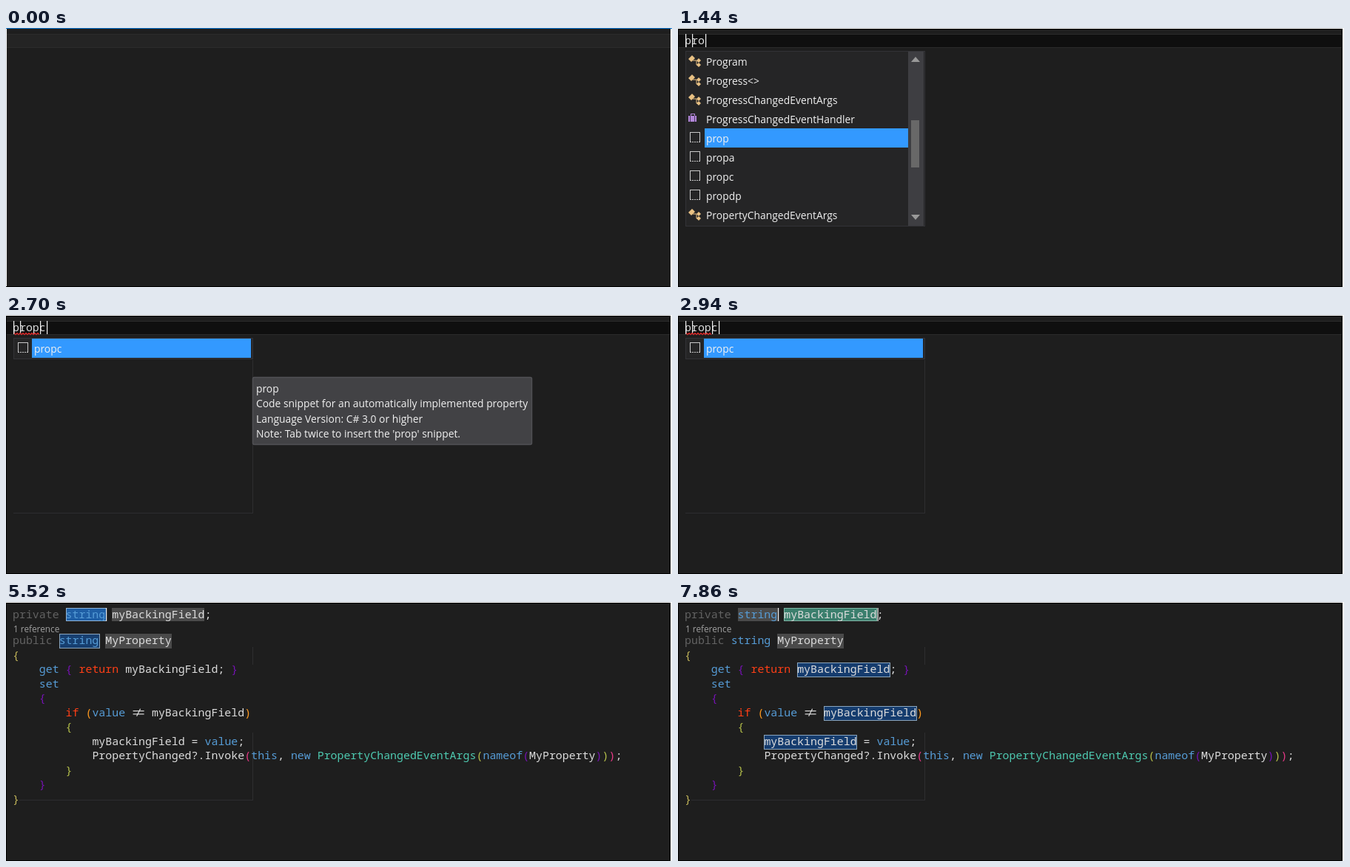
Recreate the animation shown at these times as an HTML page with a canvas. Size 900 px wide and 351 px high, loop 8 s.

```html
<!DOCTYPE html>
<html lang="en">
<head>
<meta charset="utf-8">
<title>Snippet completion</title>
<style>
html, body { margin: 0; width: 100%; height: 100%; overflow: hidden; background: #1e1e1e; }
canvas { display: block; }
</style>
</head>
<body>
<canvas id="stage" width="900" height="351"></canvas>
<script>
const ctx = document.getElementById('stage').getContext('2d');
const LOOP = 8000;
const CELL = 8.95, LEFT = 9, LINE = 19.5;
const MONO = '14.92px "Noto Sans Mono", monospace';
const UI = '13.85px "Open Sans", sans-serif';
const LENS = '11.8px "Open Sans", sans-serif';

const C = {
  bg: '#1e1e1e', text: '#dcdcdc', dim: '#626262', key: '#569cd6', flow: '#ff3f16',
  type: '#4ec9b0', gold: '#c3b65a', purple: '#7612b4', orange: '#ff9a1f',
  lime: '#b5c04a', pink: '#e63a86', select: '#3399ff', field: '#4a4a4a', line: '#2d2d30'
};

const colX = col => LEFT + col * CELL;
const baseY = row => row ? 57.2 + (row - 1) * LINE : 22.2;
const between = (t, a, b) => t >= a && t < b;

function rect(x, y, w, h, color) {
  ctx.fillStyle = color;
  ctx.fillRect(x, y, w, h);
}

function frame(x, y, w, h, color) {
  ctx.strokeStyle = color;
  ctx.lineWidth = 1;
  ctx.strokeRect(x + .5, y + .5, w - 1, h - 1);
}

function label(str, x, y, font, color) {
  ctx.font = font;
  ctx.fillStyle = color;
  ctx.fillText(str, x, y);
}

function path(points, color, width = 1, close = false) {
  ctx.beginPath();
  points.forEach(([x, y]) => ctx.lineTo(x, y));
  if (close) {
    ctx.closePath();
    ctx.fillStyle = color;
    ctx.fill();
  } else {
    ctx.strokeStyle = color;
    ctx.lineWidth = width;
    ctx.stroke();
  }
}

function withAlpha(a, draw) {
  ctx.save();
  ctx.globalAlpha = a;
  draw();
  ctx.restore();
}

const caret = x => rect(x, 8, 1.2, 18, '#f0f0f0');

function squiggle(x0, x1, y) {
  const points = [];
  for (let x = x0, i = 0; x <= x1; x += 2, i++) points.push([x, y + (i % 2 ? 1.2 : -1.2)]);
  path(points, '#e02828', 1.1);
}

/* ---------- editor window ---------- */

function drawWindow(t) {
  rect(0, 0, 900, 351, C.bg);
  const focused = t >= 240;
  if (t < 3840) {
    rect(1, 8, 897, 19, focused ? '#2b2b2b' : '#2c2c2c');
    rect(1, 9, 897, 17, focused ? '#0f0f0f' : '#242424');
  }
  rect(0, 0, 1, 351, focused ? '#000' : '#fff');
  rect(898, 0, 2, 351, '#fff');
  rect(0, 350, 898, 1, '#000');
  if (focused) {
    rect(897, 0, 1, 351, '#000');
    rect(0, 1, 898, 1, '#000');
  }
  rect(0, 0, 900, 1, focused ? '#fff' : '#0a74d0');
}

function drawTyping(t) {
  const count = [1050, 1290, 1380, 1620, 2700].filter(at => t >= at).length;
  label('propc'.slice(0, count), LEFT, 22.2, MONO, C.text);
  if (between(t, 240, 780) || t >= 1050) caret(10);
  if (t >= 1050) caret(19);
  if (between(t, 1290, 1380)) caret(28);
  if (between(t, 1380, 1620)) caret(37);
  if (between(t, 1620, 1830) || t >= 2310) caret(46);
  if (t >= 2700) {
    caret(55);
    squiggle(11, t < 3630 ? 45 : 55, 25.5);
  }
}

/* ---------- completion list ---------- */

const icons = {
  type(y) {
    const c = '#e9c183';
    path([[14, y - 3], [19, y - 8], [23, y - 4], [18, y + 1]], c, 1, true);
    path([[20, y - 1], [25, y - 1], [25, y + 5], [27, y + 5]], c);
    path([[25, y - 1], [28, y - 4], [31, y - 1], [28, y + 2]], c, 1, true);
    path([[25, y + 5], [28, y + 2], [31, y + 5], [28, y + 8]], c, 1, true);
  },
  contract(y) {
    const c = '#6db5f5';
    ctx.beginPath();
    ctx.arc(27, y - 1, 3, 0, Math.PI * 2);
    ctx.strokeStyle = c;
    ctx.lineWidth = 2;
    ctx.stroke();
    rect(16, y - 2, 8, 1.6, c);
    rect(14, y - 3, 3, 4, c);
  },
  handler(y) {
    const c = '#b387d9';
    rect(14, y - 4, 11, 8, c);
    frame(17, y - 7, 6, 4, c);
    rect(16, y - 4, 1, 8, '#503a68');
    rect(22, y - 4, 1, 8, '#503a68');
  },
  snippet(y) {
    frame(16, y - 8, 14, 14, '#c8c8c8');
    for (let x = 18; x < 29; x += 3) rect(x, y + 5, 1, 1, '#252526');
  }
};

const SNIPPETS = ['prop', 'propa', 'propc', 'propdp'].map(name => ['snippet', name]);
const LIST_PRO = [
  ['type', 'Program'], ['type', 'Progress<>'], ['type', 'ProgressChangedEventArgs'],
  ['handler', 'ProgressChangedEventHandler'], ...SNIPPETS, ['type', 'PropertyChangedEventArgs']
];
const LIST_PROP = [
  ['contract', 'INotifyPropertyChanged'], ['contract', 'INotifyPropertyChanging'], ...SNIPPETS,
  ['type', 'PropertyChangedEventArgs'], ['handler', 'PropertyChangedEventHandler'],
  ['type', 'PropertyChangingEventArgs']
];

function drawRow([kind, name], i) {
  const y = 45 + i * 26;
  icons[kind](y);
  label(name, 38, y + 6, UI, '#f1f1f1');
}

function drawList(t) {
  const scrolled = t >= 1620;
  rect(10, 31, 324, 238, '#252526');
  frame(10, 31, 324, 238, '#333337');
  rect(311, 32, 21, 236, '#3e3e42');
  path([[315, 46], [321, 39], [327, 46]], '#999', 1, true);
  path([[315, 253], [321, 260], [327, 253]], '#999', 1, true);
  if (scrolled) rect(315, 53, 11, 124, '#686868');
  else rect(315, t < 1440 ? 129 : 125, 11, 64, '#686868');
  rect(scrolled ? 35 : 36, scrolled ? 84 : 136, 275, 26, C.select);
  if (scrolled) rect(310, 136, 1, 26, C.select);
  (scrolled ? LIST_PROP : LIST_PRO).forEach(drawRow);
}

function drawSingleRow() {
  rect(10, 31, 324, 29, '#252526');
  frame(10, 31, 324, 29, '#333337');
  rect(35, 32, 296, 26, C.select);
  drawRow(SNIPPETS[2], 0);
}

function drawTooltip() {
  ctx.beginPath();
  ctx.roundRect(333.5, 84.5, 377, 91, 2);
  ctx.fillStyle = '#424245';
  ctx.fill();
  ctx.strokeStyle = '#515155';
  ctx.lineWidth = 1.5;
  ctx.stroke();
  [
    'prop',
    'Code snippet for an automatically implemented property',
    'Language Version: C# 3.0 or higher',
    "Note: Tab twice to insert the 'prop' snippet."
  ].forEach((str, i) => label(str, 338, 105 + i * 20.3, UI, '#f1f1f1'));
}

function tooltipAlpha(t) {
  if (t < 2310 || t >= 2940) return 0;
  if (t < 2400) return .13 + .29 * Math.floor((t - 2310) / 30);
  return t < 2760 ? 1 : 1 - .3 * (1 + Math.floor((t - 2760) / 60));
}

function drawListEdge(t) {
  const inCode = t >= 3840;
  const from = inCode ? 18 : 10;
  rect(from, 268, 334 - from, 1, C.line);
  rect(333, 61, 1, inCode ? 24 : 208, C.line);
  if (inCode) rect(333, 177, 1, 92, C.line);
}

/* ---------- inserted code ---------- */

// [row, column, text, colour, colour once semantic analysis is done]
const TOKENS = [
  [0, 0, 'private', C.dim], [0, 8, 'string', C.key], [0, 15, 'myBackingField;', C.text],
  [1, 0, 'public', C.dim], [1, 7, 'string', C.key], [1, 14, 'MyProperty', C.text],
  [2, 0, '{', C.gold],
  [3, 4, 'get', C.key], [3, 8, '{', C.purple], [3, 10, 'return', C.flow],
  [3, 17, 'myBackingField;', C.text], [3, 33, '}', C.purple],
  [4, 4, 'set', C.key], [5, 4, '{', C.purple],
  [6, 8, 'if', C.flow], [6, 11, '(', C.orange], [6, 12, 'value', C.text, C.key],
  [6, 21, 'myBackingField', C.text], [6, 35, ')', C.orange],
  [7, 8, '{', C.lime],
  [8, 12, 'myBackingField =', C.text], [8, 29, 'value', C.text, C.key], [8, 34, ';', C.text],
  [9, 12, 'PropertyChanged?.Invoke', C.text], [9, 35, '(', C.pink], [9, 36, 'this', C.key],
  [9, 40, ',', C.text], [9, 42, 'new', C.key],
  [9, 46, 'PropertyChangedEventArgs', C.text, C.type], [9, 70, '(', C.lime],
  [9, 71, 'nameof', C.text, C.key], [9, 77, '(', C.purple], [9, 78, 'MyProperty', C.text],
  [9, 88, ')', C.purple], [9, 89, ')', C.lime], [9, 90, ')', C.pink], [9, 91, ';', C.text],
  [10, 8, '}', C.lime], [11, 4, '}', C.purple], [12, 0, '}', C.gold]
];

function mark(row, col, len, fill, border, dotted) {
  const x = Math.round(colX(col)), y = Math.round(baseY(row) - 14);
  const w = Math.round(len * CELL), h = row ? 20 : 18;
  if (fill) rect(x, y, w, h, fill);
  if (!border) return;
  ctx.setLineDash(dotted ? [1, 2] : []);
  frame(x, y, w + 1, h, border);
  ctx.setLineDash([]);
}

function drawMarks(t) {
  const onField = t >= 6210;
  const resolved = t >= 4140;
  mark(0, 8, 6, onField ? C.field : resolved ? '#1f5fa6' : '#2f5274', resolved && !onField && '#8fb4d8');
  mark(1, 14, 10, C.field);
  if (!onField) {
    if (resolved) mark(1, 7, 6, '#173f70', '#8aa5bd');
    else mark(1, 7, 6, '', '#c07a3a', true);
  }
  const found = t >= 6480;
  mark(0, 15, 14, !onField ? C.field : found ? '#3b7f6d' : '#2f5274', found && '#7fb5a5');
  if (t >= 6330) {
    for (const [row, col] of [[3, 17], [6, 21], [8, 12]]) {
      if (found) mark(row, col, 14, '#153c6e', '#8aa5bd');
      else mark(row, col, 14, '', '#c07a3a', true);
    }
  }
}

function drawNotEqual() {
  const x = colX(18), y = baseY(6) - 5;
  rect(x + 1.5, y - 2.6, 15, 1.2, C.text);
  rect(x + 1.5, y + 1.6, 15, 1.2, C.text);
  path([[x + 6.5, y + 5], [x + 11.5, y - 5]], C.text, 1.2);
}

function lensAlpha(t) {
  if (t < 4890) return 0;
  if (t < 5310) return Math.min(4, 1 + Math.floor((t - 4890) / 90)) * .18;
  return Math.min(1, .8 + .1 * Math.floor((t - 5310) / 105));
}

function drawCode(t) {
  drawMarks(t);
  for (const [row, col, str, early, late] of TOKENS) {
    label(str, colX(col), baseY(row), MONO, t >= 4140 && late || early);
  }
  drawNotEqual();
  if (t < 4350) squiggle(19, 30, 275.5);
  withAlpha(lensAlpha(t), () => label('1 reference', 10, 41, LENS, '#a0a0a0'));
  if (between(t, 4350, 4890) || between(t, 5310, 5850) || t >= 6210) caret(135);
  if (between(t, 6810, 7350) || t >= 7860) caret(269.5);
}

/* ---------- timeline ---------- */

function draw(t) {
  drawWindow(t);
  if (t >= 2700) drawListEdge(t);
  if (t >= 3840) return drawCode(t);
  drawTyping(t);
  if (between(t, 1080, 2700)) drawList(t);
  else if (between(t, 2700, 3270)) drawSingleRow();
  const a = tooltipAlpha(t);
  if (a > 0) withAlpha(a, drawTooltip);
}

const start = performance.now();
function tick() {
  draw((performance.now() - start) % LOOP);
  requestAnimationFrame(tick);
}
tick();
</script>
</body>
</html>
```
